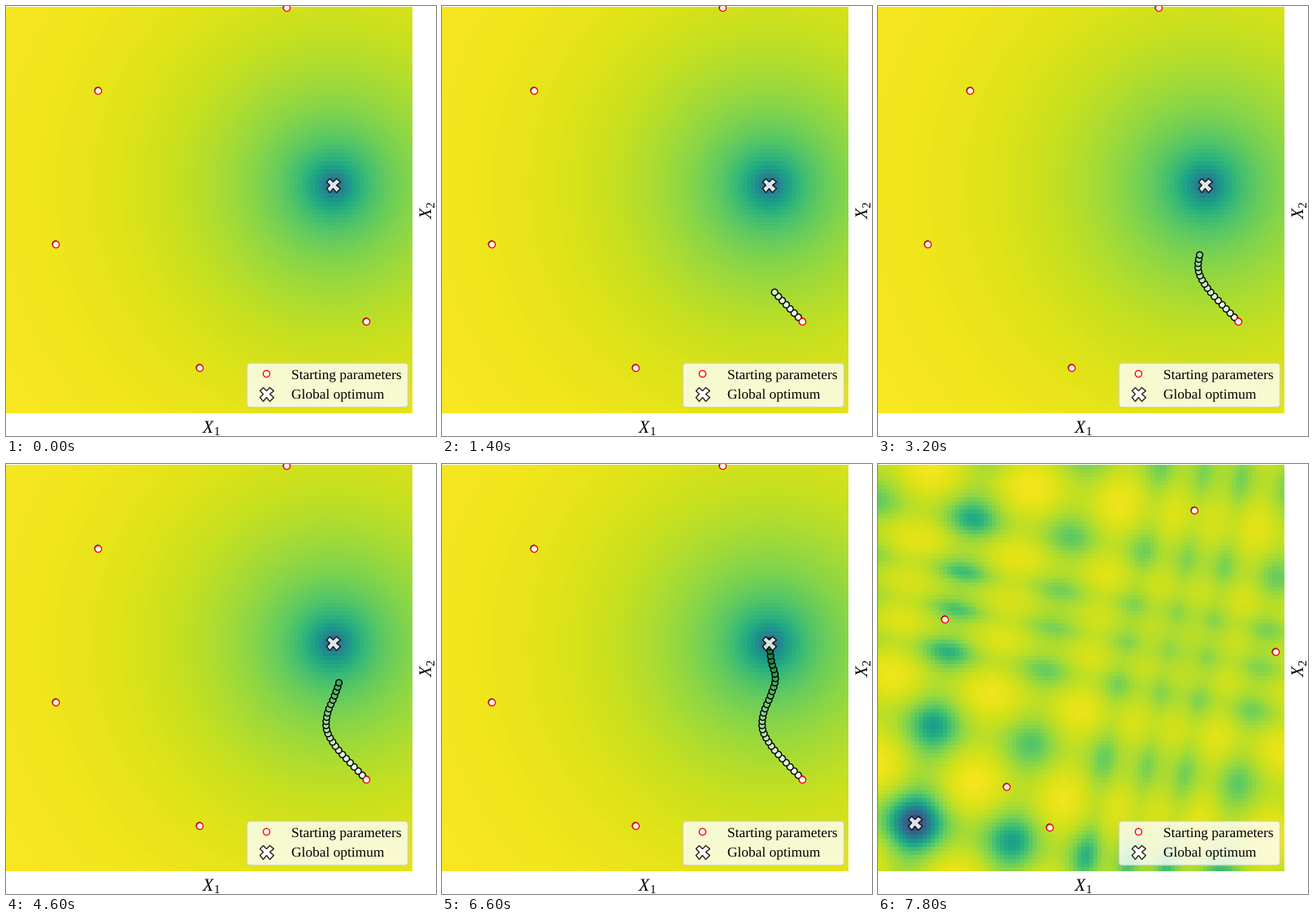
Write a matplotlib script that moves like this. It is 529 px wide and 529 px high and loops after 8000 ms.

```python
import numpy as np
import matplotlib.pyplot as plt
from matplotlib.animation import FuncAnimation
from matplotlib.patches import FancyBboxPatch

SIZE, DPI = 529, 100
FRAMES, INTERVAL = 40, 200
SWITCH = 39  # step at which the second problem begins
PX = 72 / DPI  # points per pixel

plt.rcParams["font.family"] = "Liberation Serif"
plt.rcParams["text.hinting"] = "none"

# Cell centres of the 100 x 100 heat map, in stage pixels
cells = np.arange(100) * 5 + 2.5
GX, GY = np.meshgrid(cells, cells + 1)


def funnel(cx, cy):
    """Smooth bowl with a sharp tip."""
    r = np.hypot(GX - cx, GY - cy)
    return 1 - 0.38 * np.exp(-r / 130) - 0.39 * np.exp(-r / 19)


def chirp(t):
    """Well depth and ridge height along one axis; waves tighten near 280."""
    s = np.tanh((t - 280) / 72)
    wave = np.cos(2 * np.pi * (t / 126 + 1.05 * (s + 1)))
    tight = 1 - s ** 2
    depth = 0.42 - 0.2 * tight + 0.55 * np.exp(-(t / 70) ** 2)
    return depth * np.exp(wave - 1), 0.03 * (1 - wave) * (1 - 0.8 * tight)


def lattice(cx, cy):
    """Tilted grid of wells, deepest at the optimum."""
    dx, dy = GX - cx, GY - cy
    tilt = np.arctan2(24, 125)
    c, s = np.cos(tilt), np.sin(tilt)
    well_u, ridge_u = chirp(c * dx + s * dy)
    well_v, ridge_v = chirp(s * dx - c * dy)
    return 0.868 + ridge_u + ridge_v - 0.72 * well_u * well_v


def spline(keys, t):
    """Catmull-Rom curve through evenly spaced keys."""
    k = np.array(keys, float)
    k = np.concatenate([[2 * k[0] - k[1]], k, [2 * k[-1] - k[-2]]])
    i = np.minimum(t.astype(int), len(keys) - 2)
    f = t - i
    a, b, c, d = (k[i + j] for j in range(4))
    return b + f / 2 * (c - a + f * (2 * a - 5 * b + 4 * c - d
                                     + f * (3 * (b - c) + d - a)))


# Each problem: optimum, starting points, landscape
PROBLEMS = [
    ((402, 220), [(345, 2), (113, 104), (61, 293), (238, 445), (443, 388)],
     funnel),
    ((45, 441), [(389, 57), (82, 191), (489, 231), (158, 397), (211, 447)],
     lattice),
]
FIELDS = [field(x + 0.5, y + 0.5) for (x, y), _, field in PROBLEMS]

# Optimiser path: a key every four steps
steps = np.arange(SWITCH)
PATH = np.column_stack([
    spline([443.3, 423.4, 405.3, 394.5, 395.7, 404.2, 410.2, 405.1, 402.5,
            402.5, 402.5], steps / 4),
    spline([388, 367.5, 347.1, 326.7, 306.3, 285.1, 263.8, 242, 220.6,
            216, 218], steps / 4)])
PATH_COLORS = plt.get_cmap("Greens")(np.clip(steps / 37, 0, 1))

fig = plt.figure(figsize=(SIZE / DPI, SIZE / DPI), dpi=DPI, facecolor="white")
ax = fig.add_axes([0, 0, 1, 1])
ax.axis("off")

heat = ax.imshow(FIELDS[0], cmap="viridis", vmin=0, vmax=1,
                 interpolation="nearest", extent=(0, 500, 501, 1), zorder=0)
ax.set_aspect("auto")
ax.set_xlim(0, SIZE)
ax.set_ylim(SIZE, 0)

RING = dict(ls="none", marker="o", ms=8.2 * PX, mfc="white", mec="red",
            mew=1.3 * PX, clip_on=False)
CROSS = dict(ls="none", marker="X", ms=17 * PX, mfc="white", mec="black",
             mew=1.4 * PX, alpha=0.85)

trail = ax.scatter([], [], s=(7.8 * PX) ** 2, edgecolors="black",
                   linewidths=1.4 * PX, zorder=2)
starts, = ax.plot([], [], zorder=3, **RING)
best_mark, = ax.plot([], [], zorder=4, **CROSS)

# Legend
ax.add_patch(FancyBboxPatch(
    (296, 438.5), 198, 54.5, boxstyle="round,pad=0,rounding_size=4",
    fc="white", ec="0.8", lw=1.3 * PX, alpha=0.8, snap=True, zorder=5))
ax.plot([320], [452], zorder=6, **RING)
ax.plot([320], [477], zorder=6, **CROSS)
for label, y in (("Starting parameters", 458), ("Global optimum", 483)):
    ax.text(351, y, label, fontsize=17.4 * PX, va="baseline", zorder=6)


def axis_label(x, y, index, angle):
    """Italic X with a small index after and below it."""
    style = dict(rotation=angle, rotation_mode="anchor", va="baseline")
    c, s = np.cos(np.radians(angle)), np.sin(np.radians(angle))
    along, below = 14.3, 3
    ax.text(x, y, "X", fontsize=21.7 * PX, style="italic", **style)
    ax.text(x + along * c + below * s, y - along * s + below * c, index,
            fontsize=15 * PX, **style)


axis_label(241.5, 525, "1", 0)
axis_label(524.5, 262.5, "2", 90)


def draw(n):
    k = int(n >= SWITCH)
    best, points, _ = PROBLEMS[k]
    heat.set_data(FIELDS[k])
    starts.set_data(*zip(*points))
    best_mark.set_data([best[0]], [best[1]])

    dots = np.array(points) + (0.1, 0)
    colors = np.ones((len(points), 4))
    if k == 0:
        dots = np.vstack([dots, PATH[1:n + 1]])
        colors = np.vstack([colors, PATH_COLORS[1:n + 1]])
    trail.set_offsets(dots)
    trail.set_facecolors(colors)
    return heat, trail, starts, best_mark


anim = FuncAnimation(fig, draw, frames=FRAMES, interval=INTERVAL,
                     init_func=lambda: draw(0), repeat=True, repeat_delay=0)
plt.show()
```
